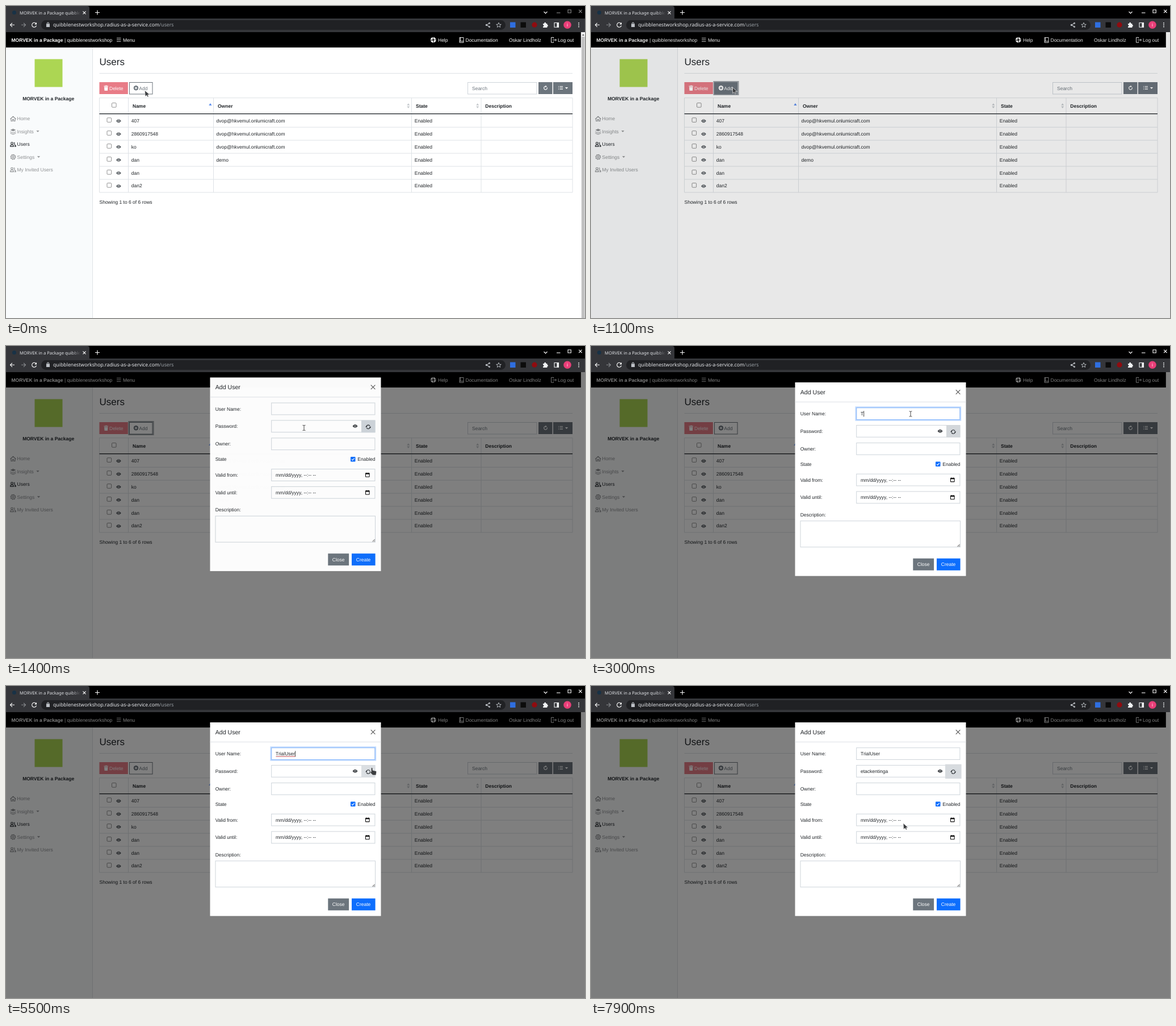
Animation of 1020x549 px, one loop 8 s. Source, as an HTML page:

```html
<!DOCTYPE html>
<html lang="en">
<head>
<meta charset="utf-8">
<title>Users</title>
<style>
html, body { margin: 0; width: 100%; height: 100%; overflow: hidden; background: #fff; }
svg { display: block; width: 100vw; height: 100vh; }
text { font: 8.5px "Liberation Sans", Arial, sans-serif; fill: #212529; text-rendering: geometricPrecision; white-space: pre; }
.b { font-weight: bold; }
.w { fill: #fff; }
.mute { fill: #8f9193; }
.grey { fill: #6c757d; }
.h1 { font-size: 17px; }
.h5 { font-size: 10.6px; }
.tab { font: 7.65px "Noto Sans", sans-serif; fill: #dfe1e5; }
.url { font: 8.7px "Noto Sans", sans-serif; fill: #e8eaed; }
.line { fill: none; stroke: #dee2e6; }
.field { fill: #fff; stroke: #ced4da; }
.ico { fill: none; stroke: currentColor; stroke-width: 1.1; }
.sym { fill: currentColor; }
</style>
</head>
<body>
<svg viewBox="0 0 1020 549" preserveAspectRatio="none">
<defs>
  <linearGradient id="fade"><stop offset="0" stop-color="#35363a" stop-opacity="0"/><stop offset="1" stop-color="#35363a"/></linearGradient>
  <g id="eye"><path class="sym" d="M-4.4 0Q0-6 4.4 0Q0 6-4.4 0Z"/><circle r="1.9" fill="#fff"/><circle r="1.2" class="sym"/></g>
  <g id="people" class="ico"><circle cx="-2" cy="-2" r="1.8"/><path d="M-4.8 3.6V2.4Q-4.6.8-2 .8T.8 2.4V3.6ZM1.4-3.6A1.8 1.8 0 0 1 1.4-.2M2.2.9Q4.7 1 4.7 3.6H2.4"/></g>
  <path id="caretDown" class="sym" d="M-2.6-1.2H2.6L0 1.6Z"/>
  <g id="plus"><circle r="4.2" class="sym"/><path class="plusMark" d="M-2.4 0H2.4M0-2.4V2.4" stroke="#fff" stroke-width="1.3"/></g>
  <g id="refresh" class="ico"><path d="M-3.4-.6A3.5 3.5 0 0 1 3-1.6M3.4.6A3.5 3.5 0 0 1-3 1.6"/><path class="sym" stroke="none" d="M1.8-.4H5L3.4 2ZM-1.8.4H-5L-3.4-2Z"/></g>
  <g id="calendar" class="ico"><rect x="-3.3" y="-3" width="6.6" height="6.4" rx=".5"/><path d="M-3.3-2.2H3.3" stroke-width="2"/><path d="M-1.8-4V-3M1.8-4V-3"/></g>
  <path id="sortBoth" fill="#c4c8cc" d="M-2.5-.9H2.5L0-4.3ZM-2.5 .9H2.5L0 4.3Z"/>
</defs>

<!-- browser frame -->
<rect width="1020" height="46" fill="#000"/>
<path d="M0 0H143Q147 0 147 4V23H0Z" fill="#35363a"/>
<rect y="22" width="1020" height="24" fill="#35363a"/>
<rect x="62" y="25" width="818" height="17" rx="8.5" fill="#202124"/>
<circle cx="14.5" cy="11.5" r="3.5" fill="#183246"/>
<text class="tab" x="24" y="14.7">MORVEK in a Package quibblen</text>
<rect x="116" y="4" width="15" height="15" fill="url(#fade)"/>
<rect x="131" y="4" width="14" height="15" fill="#35363a"/>
<g class="ico" color="#fff" stroke-width="1.2">
  <path d="M135.5 9.3L140.5 14.3M140.5 9.3L135.5 14.3M157 11.5H165M161 7.5V15.5M947.5 10L950.5 13L953.5 10"/>
  <path d="M15 33.3H7.5M11 29.8L7.5 33.3L11 36.8M53 31A4 4 0 1 0 53.5 34.5"/>
  <path class="sym" stroke="none" d="M54 28.8V32.4H50.4Z"/>
</g>
<path class="ico" color="#8b8d91" d="M27 33.3H34.5M31 29.8L34.5 33.3L31 36.8"/>
<g class="ico" color="#bdc1c6">
  <rect class="sym" x="71.5" y="32" width="5" height="4.5"/><path d="M72.5 32V30.5A1.5 1.5 0 0 1 75.5 30.5V32"/>
  <path d="M851.2 30.5L846.5 33.4L851.2 36.3"/><circle cx="851.5" cy="30.3" r="1"/><circle cx="846.3" cy="33.4" r="1"/><circle cx="851.5" cy="36.5" r="1"/>
  <path stroke-width=".9" d="M868 29.2L869.2 32.2L872.3 32.4L869.9 34.4L870.7 37.4L868 35.7L865.3 37.4L866.1 34.4L863.7 32.4L866.8 32.2Z"/>
</g>
<text class="url" x="83" y="36.4">quibblenestworkshop.radius-as-a-service.com<tspan fill="#9aa0a6">/users</tspan></text>
<rect x="888" y="28.5" width="9.5" height="9.5" fill="#2f6fe0"/>
<rect x="906.5" y="28.5" width="9.5" height="9.5" fill="#0c0c0c"/>
<circle cx="931" cy="33.2" r="4.6" fill="#8e0c10"/>
<path fill="#f1f3f4" d="M946 31H948.2A1.6 1.6 0 1 1 951.2 31H953.4V33A1.5 1.5 0 1 1 953.4 36V38H946V36A1.5 1.5 0 0 0 946 33Z"/>
<path class="ico" color="#f1f3f4" d="M966 29.5H973.5V37.2H966ZM971.3 29.5V37.2" stroke-width="1.4"/>
<path fill="#f1f3f4" d="M970.5 29H974V37.5H970.5Z"/>
<circle cx="989" cy="33.2" r="6.8" fill="#e83e78"/><text class="w" x="988" y="36">i</text>
<g fill="#f1f3f4"><circle cx="1009" cy="30" r="1"/><circle cx="1009" cy="33.3" r="1"/><circle cx="1009" cy="36.6" r="1"/></g>
<g id="controls" class="ico" color="#fff"><path d="M970 12H976.5"/><path d="M990 6.7H995.3V12H990Z"/><path d="M1009.2 6.7L1014.5 12M1014.5 6.7L1009.2 12"/></g>

<!-- page -->
<rect y="46" width="1020" height="503" fill="#fff"/>
<rect y="46" width="1012.8" height="27" fill="#000"/>
<text class="w" x="9.5" y="62.5"><tspan class="b">MORVEK in a Package</tspan> | quibblenestworkshop</text>
<g class="ico" color="#fff">
  <path stroke-width=".8" d="M195 56.5H202.5M195 59.5H202.5M195 62.5H202.5"/>
  <circle cx="752.7" cy="59.7" r="3.4" stroke-width="2.4" stroke-dasharray="3.9 1.44"/><circle cx="752.7" cy="59.7" r="4.5" stroke-width=".6"/><circle cx="752.7" cy="59.7" r="2" stroke-width=".7"/>
  <path stroke-width=".9" d="M799 55.5H806V64.3H799ZM799 62H806M800.6 55.5V62M964.5 57V55.3H960.5V64.2H964.5V62.5M963 59.8H969.5M967.5 57.8L969.5 59.8L967.5 61.8"/>
</g>

<rect y="73" width="152" height="476" fill="#f9fbfc"/>
<path class="line" d="M152.5 73V549"/>
<rect x="50.5" y="93.5" width="49" height="49" fill="#acd653"/>
<text class="b" x="74.7" y="165.5" text-anchor="middle">MORVEK in a Package</text>
<g color="#8f9193">
  <path class="ico" d="M7.5 199L12.5 194.3L17.5 199M9 198V202.5H11.5V199.5H13.5V202.5H16V198"/>
  <path class="sym" d="M7.5 218.3L12.5 216L17.5 218.3L12.5 220.6ZM7.5 220.7L12.5 223L17.5 220.7V221.8L12.5 224L7.5 221.8ZM7.5 223.2L12.5 225.5L17.5 223.2V224.2L12.5 226.4L7.5 224.2Z"/>
  <use href="#people" x="12.5" y="243.5" color="#212529"/><use href="#people" x="12.5" y="288"/>
  <circle class="ico" cx="12.5" cy="265.7" r="1.4"/><circle class="ico" cx="12.5" cy="265.7" r="3.6"/><circle class="ico" cx="12.5" cy="265.7" r="4.4" stroke-dasharray="1.7 1.75"/>
  <use href="#caretDown" x="56" y="220.5"/><use href="#caretDown" x="57.5" y="265.5"/>
</g>
<g id="navText"></g>

<text class="h1" x="164.5" y="103.5">Users</text>
<path class="line" d="M164.5 118.5H998"/>
<rect x="164.5" y="134" width="50.3" height="21" fill="#e87c87"/>
<path fill="#fff" d="M172.5 140.5H175L175.5 139.8H177.5L178 140.5H180V141.7H172.5ZM173 142.4H179.5L179 149H173.5Z"/>
<text class="w" x="182" y="147.6">Delete</text>
<rect id="addRing" x="216.4" y="133" width="43.2" height="23" fill="none" stroke="#6c757d" stroke-opacity=".65" stroke-width="2"/>
<g id="add"><rect id="addBox" x="217.5" y="134.5" width="40.5" height="20.5" stroke="#6c757d"/><use href="#plus" x="229" y="144.3"/><text x="234.3" y="147.6" style="fill:currentColor">Add</text></g>
<rect class="field" x="813.5" y="134.5" width="121.5" height="20.5"/><text class="grey" x="821" y="147.6">Search</text>
<path fill="#6c757d" d="M938 134H962.5V155H938ZM964 134H998V155H964Z"/>
<g class="ico" color="#fff" stroke-width=".8"><path d="M951.8 141.7A2.9 2.9 0 1 0 953.2 143.3"/><path class="sym" stroke="none" d="M950.3 139.8L953 141.5L950.3 143.2Z"/><path d="M975.5 141.5H981M975.5 144H981M975.5 146.5H981M973 141.5H974M973 144H974M973 146.5H974"/></g>
<use href="#caretDown" x="987.5" y="144.3" color="#fff"/>
<g id="table"></g>
<path fill="#5b8def" d="M357.3 175H362.5L359.9 171Z"/>
<use href="#sortBoth" x="708.8" y="175.6"/><use href="#sortBoth" x="830.7" y="175.6"/>
<text x="164.5" y="347.8">Showing 1 to 6 of 6 rows</text>
<g id="scrollbar"><rect x="1013" y="46" width="7" height="503" fill="#f1f1f1"/><rect x="1014" y="54" width="5.5" height="495" fill="#c1c1c1"/><path fill="#505050" d="M1014.8 52H1018.8L1016.8 49.5Z"/></g>
<rect id="backdrop" y="46" width="1020" height="503"/>

<!-- dialog -->
<g id="modal">
  <rect x="359.5" y="64" width="301" height="340.7" fill="#fff"/>
  <text class="h5" x="368.7" y="84.7">Add User</text>
  <path class="ico" color="#555" d="M642.8 77.2L650.4 84.8M650.4 77.2L642.8 84.8"/>
  <path class="line" d="M359.5 98.5H660.5"/>
  <g id="labels"></g>
  <g id="fields"></g>
  <g id="nameFocus" fill="none"><rect x="466.5" y="107.5" width="184.6" height="23.2" stroke="#c2dbfe" stroke-width="2.2"/><rect x="467.7" y="108.7" width="182.2" height="20.8" stroke="#86b7fe"/></g>
  <rect id="refreshRing" x="624" y="137.7" width="28.6" height="25.3" fill="#d7dbdf"/>
  <rect id="refreshBox" x="626" y="139.3" width="24.5" height="21.6"/>
  <use href="#refresh" x="638.2" y="151" color="#212529"/>
  <use href="#eye" x="615" y="149.7" color="#212529"/>
  <text id="userName" x="475" y="122.3"></text>
  <path id="spelling" d="M475.5 124H509.5" stroke="#b8323c" stroke-width=".9"/>
  <rect id="typeCaret" y="114.3" width=".8" height="10" fill="#111"/>
  <text id="password" x="475" y="153.2"></text>
  <rect x="607" y="203.5" width="8.5" height="8.5" rx="1" fill="#0d6efd"/><path class="ico" color="#fff" d="M608.9 207.8L610.6 209.6L613.7 205.9"/>
  <text x="619.3" y="210.8">Enabled</text>
  <path class="ico" color="#888" stroke-width=".7" d="M645.5 353L649.7 348.8M648 353L649.7 351.3"/>
  <rect x="567.3" y="373.8" width="36.8" height="21" fill="#6c757d"/><text class="w" x="574.8" y="387.3">Close</text>
  <rect x="609" y="373.8" width="41.6" height="21" fill="#0d6efd"/><text class="w" x="616.8" y="387.3">Create</text>
</g>

<!-- pointers -->
<g id="pointers" fill="#3b3d40" stroke="#f4f4f4" stroke-width=".7">
  <path id="arrow" d="M.5 .5L9 8L5.6 8.3L7.3 11.3L5.3 12.1L3.7 9L1.2 11.2Z"/>
  <path id="beam" d="M-2.4-4.6Q-.6-4.6 0-3.9Q.6-4.6 2.4-4.6M0-3.9V3.9M-2.4 4.6Q-.6 4.6 0 3.9Q.6 4.6 2.4 4.6" fill="none" stroke="#333" stroke-width=".9"/>
  <path id="hand" d="M1.4 0Q2.8 0 3 1.6V4.6L8.6 6Q9.9 6.4 9.6 8L8.8 13.3H3.2L-1.4 8.7Q-1.6 7.2 .2 7.6V1.6Q.2 0 1.4 0Z" transform="translate(-2.5 0)"/>
</g>
</svg>
<script>
const LOOP = 8000;
const $ = id => document.getElementById(id);
const text = (x, y, s, cls = '') => `<text class="${cls}" x="${x}" y="${y}">${s}</text>`;
const box = (x, y, w, h, cls) => `<rect class="${cls}" x="${x}" y="${y}" width="${w}" height="${h}"/>`;
const check = (x, y) => `<rect x="${x}" y="${y}" width="7.6" height="7.6" rx="1.2" fill="#fff" stroke="#767676" stroke-width=".8"/>`;

$('navText').innerHTML =
  [[206, 'Menu'], [761, 'Help'], [809.5, 'Documentation'], [886, 'Oskar Lindholz'], [972, 'Log out']]
    .map(([x, s]) => text(x, 62.5, s, 'w')).join('') +
  ['Home', 'Insights', 'Users', 'Settings', 'My Invited Users']
    .map((s, i) => text(19.5, 201.4 + 22.4 * i, s, s === 'Users' ? '' : 'mute')).join('');

const mail = 'dvop@hkvemul.onlumicraft.com';
const rows = [['407', mail], ['2860917548', mail], ['ko', mail], ['dan', 'demo'], ['dan', ''], ['dan2', '']];
const rowY = i => 190.3 + 22.95 * i;
$('table').innerHTML =
  `<path class="line" d="M164.5 161.7H998V328H164.5ZM215.5 161.7V328M365.5 161.7V328M714.5 161.7V328M837 161.7V328${rows.map((_, i) => `M164.5 ${rowY(i)}H998`).join('')}"/>` +
  '<path d="M164.5 189.6H998" stroke="#212529" stroke-width="1.3"/>' + check(186.5, 170.6) +
  [[223, 'Name'], [373, 'Owner'], [722, 'State'], [844.3, 'Description']].map(([x, s]) => text(x, 178.5, s, 'b')).join('') +
  rows.map(([name, owner], i) => {
    const y = rowY(i);
    return check(178, y + 6.5) + `<use href="#eye" x="198.4" y="${y + 11.9}" color="#50565b"/>` +
      text(220.8, y + 14.4, name) + text(370.6, y + 14.4, owner) + text(719.8, y + 14.4, 'Enabled');
  }).join('');

$('labels').innerHTML =
  [[122.2, 'User Name:'], [153, 'Password:'], [184, 'Owner:'], [210.8, 'State'], [238.5, 'Valid from:'], [269.4, 'Valid until:'], [299.8, 'Description:']]
    .map(([y, s]) => text(368.7, y, s)).join('');
$('fields').innerHTML =
  [108.7, 139.5, 170.5, 225.2, 256].map(y => box(467.7, y, 182.2, 20.8, 'field')).join('') +
  box(369, 307.8, 281.5, 46, 'field') +
  [238.5, 269.4].map(y => text(475, y, 'mm/dd/yyyy, --:-- --') + `<use href="#calendar" x="636.8" y="${y - 3}" color="#111"/>`).join('');

// Each track lists [start ms, value...]; a value holds until the next entry.
const tracks = {
  pointer: [[0, 'arrow', 244, 148], [300, 'arrow', 330, 173], [500, 'arrow', 300, 164], [600, 'arrow', 262, 149],
    [700, 'arrow', 248.5, 142.5], [1200, 'arrow', 263, 142.5], [1300, 'arrow', 380, 143], [1400, 'beam', 525, 144],
    [1500, 'beam', 545, 140], [1600, 'beam', 558, 128], [1700, 'beam', 563, 119.5], [4500, 'arrow', 692, 210],
    [4900, 'arrow', 640, 98], [5300, 'hand', 645.5, 142], [5500, 'hand', 645.5, 143.6], [7600, 'arrow', 596, 187],
    [7700, 'arrow', 535, 232], [7800, 'arrow', 546, 244], [7900, 'arrow', 549.5, 241]],
  hover: [[0, 0], [700, .6], [800, 1], [1200, .08], [1300, 0]],
  addRing: [[0, 0], [1000, .6], [1100, 1], [1600, .5], [1700, 0]],
  backdrop: [[0, 0], [1100, .09], [1200, .44], [1300, .5]],
  drop: [[0, -26.6, 0], [1300, -20, .3], [1400, -8.6, .98], [1500, -1.2, 1], [1600, 0, 1]],
  nameFocus: [[0, 0], [1900, .35], [2000, .85], [2100, 1], [5900, .4], [6000, 0]],
  caret: [[0, 0], [2000, 1], [2500, 0], [3000, 1], [4900, 0], [5500, 1], [5900, 0]],
  spelling: [[0, 0], [5300, 1], [5900, 0]],
  typed: [[0, 0], [3000, 1], [3100, 3], [3300, 5], [3700, 6], [4000, 8], [4100, 9]],
  refreshRing: [[0, 0], [5900, .5], [6000, 1]],
  refreshBox: [[0, '#ced4da'], [1700, '#d3d7db'], [5300, '#dadee2'], [6000, '#d7dbdf']],
  password: [[0, ''], [6000, 'ulomperishav'], [6200, 'ndorichalest'], [6400, 'imarethoncul'], [6500, 'opedlistrane'],
    [6700, 'ackerounimet'], [6900, 'thisablengor'], [7000, 'erinduckalom'], [7300, 'youstamineld'], [7400, 'etackentinga']]
};
const at = (name, t) => tracks[name].findLast(cue => cue[0] <= t).slice(1);
const mix = (a, b, k) => `rgb(${a.map((v, i) => v + (b[i] - v) * k)})`;
const fade = (id, value) => $(id).setAttribute('opacity', value);
const WHITE = [255, 255, 255], GREY = [108, 117, 125];

function draw(t) {
  const [kind, x, y] = at('pointer', t);
  $('pointers').setAttribute('transform', `translate(${x} ${y})`);
  for (const id of ['arrow', 'beam', 'hand']) fade(id, id === kind ? 1 : 0);

  const [hover] = at('hover', t);
  $('addBox').setAttribute('fill', mix(WHITE, GREY, hover));
  $('add').style.color = mix(GREY, WHITE, hover);
  document.querySelector('.plusMark').setAttribute('stroke', mix(WHITE, GREY, hover));

  for (const id of ['addRing', 'backdrop', 'nameFocus', 'spelling', 'refreshRing']) fade(id, at(id, t)[0]);
  fade('controls', t < 1000 ? .55 : 1);
  fade('scrollbar', t < 1100 ? 1 : 0);

  const [shift, alpha] = at('drop', t);
  $('modal').setAttribute('transform', `translate(0 ${shift})`);
  fade('modal', alpha);

  $('userName').textContent = 'TrialUser'.slice(0, at('typed', t)[0]);
  $('typeCaret').setAttribute('x', 475.1 + $('userName').getComputedTextLength());
  fade('typeCaret', at('caret', t)[0]);
  $('refreshBox').setAttribute('fill', at('refreshBox', t)[0]);
  $('password').textContent = at('password', t)[0];
}

const start = performance.now();
function tick() {
  draw((performance.now() - start) % LOOP);
  requestAnimationFrame(tick);
}
tick();
</script>
</body>
</html>
```
